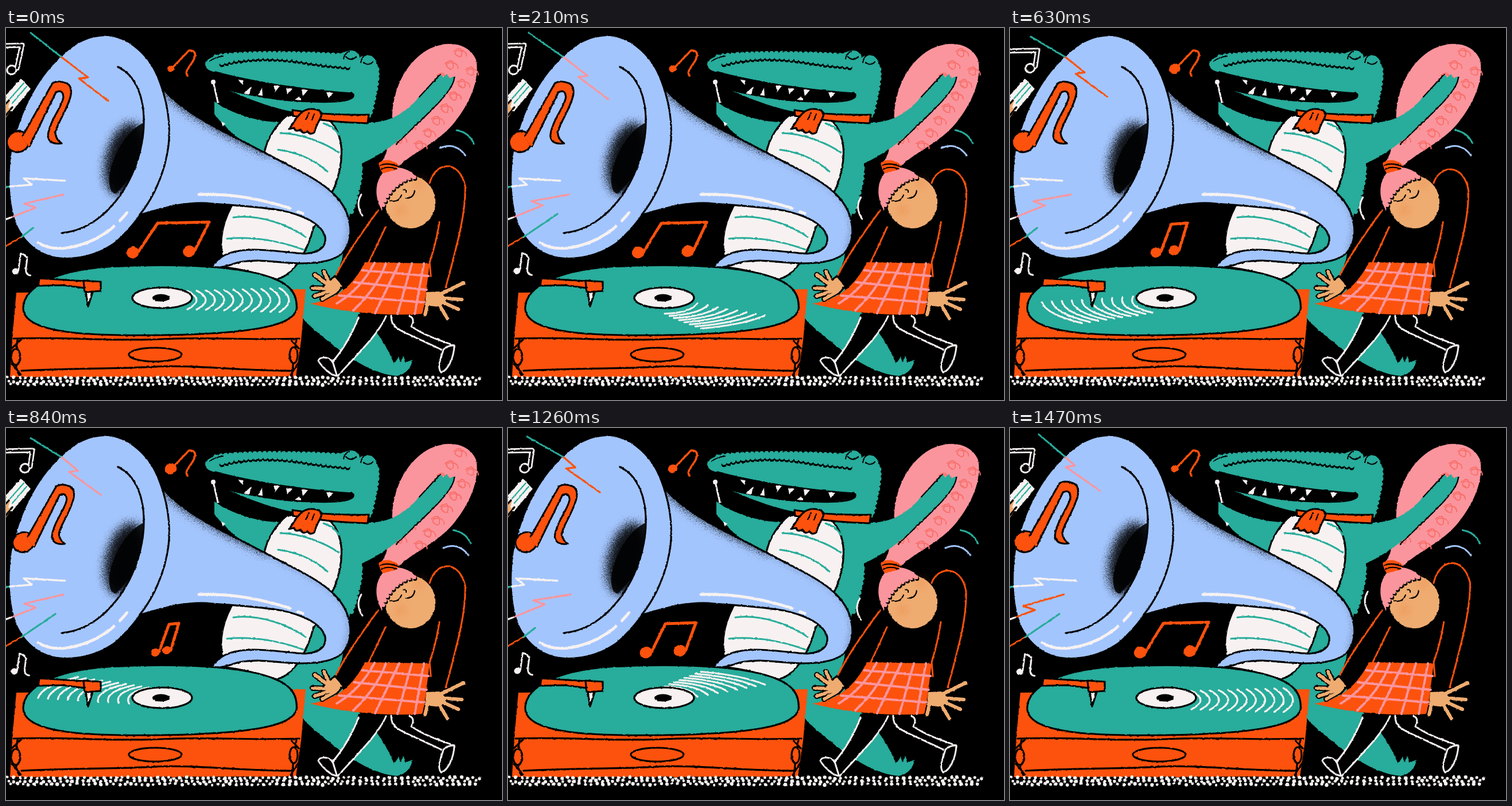
An HTML page that plays this animation: 864 px wide and 648 px high, repeating every 1.68 s.

```html
<!DOCTYPE html>
<html lang="en">
<head>
<meta charset="utf-8">
<title>Gramophone</title>
<style>
:root{--blue:#a3c5fd;--teal:#28ac9b;--red:#fc520d;--pink:#fb959d;--white:#f7f2f1;--skin:#efac71}
html,body{margin:0;width:100%;height:100%;overflow:hidden;background:#000}
svg{display:block;width:100%;height:100%}
path,ellipse{stroke-linecap:round;stroke-linejoin:round}
.blue{fill:var(--blue)}.teal{fill:var(--teal)}.red{fill:var(--red)}.pink{fill:var(--pink)}
.white{fill:var(--white)}.skin{fill:var(--skin)}
.ink{stroke:#000;stroke-width:3.2}
.line{fill:none;stroke:#000;stroke-width:3.2}
.thin{stroke-width:2.2}.mid{stroke-width:3}.bold{stroke-width:5}
.w{stroke:var(--white)}.t{stroke:var(--teal)}.r{stroke:var(--red)}.k{stroke:var(--pink)}.s{stroke:var(--skin)}
.dots{fill:none;stroke-width:9;stroke-dasharray:0 8.5}
.pose{visibility:hidden;animation:show 1.68s step-end infinite;animation-delay:calc((var(--i) - 8)*210ms)}
@keyframes show{0%{visibility:visible}12.5%,100%{visibility:hidden}}
</style>
</head>
<body>
<svg viewBox="0 0 864 648" preserveAspectRatio="none">
<defs>
  <filter id="rough" filterUnits="userSpaceOnUse" x="0" y="0" width="864" height="648" color-interpolation-filters="sRGB">
    <feTurbulence type="fractalNoise" baseFrequency=".2" numOctaves="2" seed="4"/>
    <feDisplacementMap in="SourceGraphic" scale="2.6" xChannelSelector="R" yChannelSelector="G"/>
  </filter>
  <filter id="spray" filterUnits="userSpaceOnUse" x="0" y="0" width="864" height="648" color-interpolation-filters="sRGB">
    <feGaussianBlur in="SourceGraphic" stdDeviation="7" result="b"/>
    <feTurbulence type="fractalNoise" baseFrequency=".8" numOctaves="2" seed="7"/>
    <feDisplacementMap in="b" scale="34" xChannelSelector="R" yChannelSelector="G"/>
  </filter>
  <path id="rim" d="M195,68C248,92 252,185 219,256C198,302 156,352 97,357"/>
  <clipPath id="mouth"><path d="M195,68C248,92 252,185 219,256C198,302 156,352 97,357L0,357V68Z"/></clipPath>
  <path id="tube" d="M274,106C300,138 350,166 400,191L500,243C550,268 600,298 600,355C598,398 570,410 512,410C470,409 448,402 412,407C392,410 386,418 358,417C368,400 386,388 425,386C468,386 492,392 522,393C548,391 558,380 556,364C550,340 515,326 485,319C440,310 390,309 350,305C305,303 270,315 235,325Z"/>
  <clipPath id="tubeClip"><use href="#tube"/></clipPath>
  <path id="ridge" d="M376,60C420,48 470,48 520,56S575,62 598,66"/>
  <path id="fringe" d="M711,260C688,262 664,282 656,312"/>
  <path id="fingers" d="M564,446L554,425M562,448L538,430M560,454L534,453M564,458L538,467M572,460L551,472M756,464L797,444M758,470L794,473M757,476L788,490M752,478L769,506M735,478L730,499"/>
</defs>
<rect width="864" height="648"/>
<g filter="url(#rough)">
  <!-- paper and hand at the left edge -->
  <path class="white" d="M0,117L26,88L43,106L10,146L0,138Z"/>
  <path class="line t thin" d="M7,123L31,96M11,131L36,102"/>
  <path class="skin" d="M-4,140L4,124L7,127L4,138L12,138L-4,162Z"/>
  <path class="line" d="M-2,134L5,126M0,152L11,138"/>

  <!-- ponytail -->
  <path class="pink" d="M654,233C668,215 671,180 673,148C676,100 700,56 738,36C772,20 808,28 819,56C826,92 806,134 780,166C752,200 715,212 685,240Z"/>
  <g id="curls"></g>

  <!-- crocodile -->
  <path class="teal" d="M500,150L632,165C668,164 694,150 720,120L756,80L762,86L768,80L772,88L781,84C780,104 756,130 715,168C680,202 650,222 620,236C622,265 612,300 600,318L585,405C575,425 582,455 600,480C640,520 660,545 676,585L684,573L687,582L693,571L695,583L708,578C706,592 696,604 680,606C630,602 575,560 522,512L470,440L440,300L470,180Z"/>
  <path class="line thin" d="M781,86C780,104 756,130 715,168L680,202M756,81L720,120"/>
  <path class="dots t" d="M618,245C616,275 608,300 600,325"/>
  <path class="teal" d="M363,128C390,148 440,165 482,164L450,218C415,204 385,178 363,150Z"/>
  <path class="white" d="M375,163l6,3l-3,6z"/>
  <path class="line w" d="M361,94L369,129"/><circle class="white" cx="361" cy="94" r="4"/>
  <path class="white ink" d="M490,152L560,157C588,182 592,225 572,278L535,350C520,405 490,440 465,437C430,424 405,420 384,417C368,385 374,345 393,310L450,218C454,192 474,164 490,152Z"/>
  <path class="line t mid" d="M478,183C515,184 555,200 580,217M474,212C512,217 540,232 560,250M553,166C566,170 574,176 580,186M396,330C440,324 490,342 522,364M385,367C430,362 480,372 518,386"/>
  <path class="teal" d="M347,62C350,50 372,46 400,44L560,44C580,50 584,42 592,41C606,36 616,42 616,52C624,44 642,46 645,60C653,72 648,95 644,112L635,156L500,146C462,138 432,128 383,106L410,112L605,121L606,114C540,112 440,98 365,77C350,74 347,68 347,62Z"/>
  <path d="M362,76C440,94 540,112 606,114L606,120C590,130 510,130 470,124C430,118 400,114 383,106Z"/>
  <path class="line" d="M383,106C420,116 480,127 530,128C570,130 606,128 606,116M365,77C440,98 540,110 603,114"/>
  <path class="white" d="M404,90l9,1l-1,8zM466,100l11,1l-8,10zM488,104l11,2l-9,10zM515,107l11,1l-9,11zM558,112l12,1l-8,9zM414,114l13,-12l-3,14zM439,117l7,-13l1,14zM503,125l8,-6l3,7z"/>
  <path class="dots t" d="M366,50C410,43 500,43 582,48"/>
  <path class="dots t" d="M646,72C648,95 640,125 634,150"/>
  <use href="#ridge" class="dots" stroke="#000" y="3.5"/><use href="#ridge" class="dots t"/>
  <path class="line thin" d="M355,58C362,52 370,50 378,49M592,50q9,9 18,0M623,60q8,7 16,-1M588,54q2,-11 10,-13M618,60q2,-10 8,-13"/>
  <path class="red ink" d="M499,143C545,150 590,152 632,151L630,166C585,165 540,160 500,153Z"/>
  <path class="red ink" d="M516,146C528,138 548,140 550,150C548,160 541,166 537,182Q530,187 525,180Q517,186 513,177Q504,182 502,174L493,176C500,168 505,155 516,146Z"/>
  <path class="line thin" d="M528,148L522,160M537,150L533,160"/>

  <!-- horn -->
  <use href="#tube" class="blue ink"/>
  <g clip-path="url(#tubeClip)"><g filter="url(#spray)" fill="none" stroke="#000">
    <path stroke-width="14" d="M272,98C300,130 350,160 400,185L455,212"/>
    <path stroke-width="8" opacity=".5" d="M455,210L540,256C592,284 610,320 605,360L596,395"/>
  </g></g>
  <path class="blue" d="M100,47C126,22 150,14 178,14C230,20 268,75 278,125C287,165 287,205 274,245C256,295 228,338 190,372C160,394 130,400 100,400C60,398 34,374 20,345C6,312 3,262 10,215C22,160 48,92 100,47Z"/>
  <path class="line" d="M238,42C268,75 290,145 283,205C277,250 258,295 233,325"/>
  <g clip-path="url(#mouth)">
    <ellipse cx="207" cy="228" rx="33" ry="64" transform="rotate(14 207 228)" filter="url(#spray)" opacity=".9"/>
    <path opacity=".85" d="M242,164C214,175 188,215 181,252C177,276 184,290 192,288L240,236Z"/>
  </g>
  <use href="#rim" class="line"/>
  <path class="line w bold" d="M336,290C400,288 450,300 495,314M509,320L517,323M56,374C90,396 150,378 188,346M198,336L211,322"/>

  <!-- turntable -->
  <path class="red" d="M18,461L522,455L514,545L505,607L7,608L11,540Z"/>
  <path class="line" d="M13,541C120,538 180,546 270,542S430,544 511,541M27,597C120,592 200,594 260,590S420,598 496,597M20,543Q18,555 17,574T24,606M26,543L10,558M10,585L26,604M506,543Q504,555 502,570T498,606M496,543L510,558M510,582L496,604"/>
  <ellipse class="red ink" cx="17" cy="573" rx="8" ry="14"/><ellipse class="red ink" cx="501" cy="570" rx="7" ry="14"/>
  <ellipse class="line" cx="260" cy="569" rx="46" ry="12"/>
  <path class="teal ink" d="M30,488C30,450 90,418 200,415C300,410 420,415 470,438C500,450 508,470 506,490C500,520 420,533 270,535C130,537 30,530 30,488Z"/>
  <g id="grooves"></g>
  <ellipse class="white ink" cx="272" cy="470" rx="52" ry="18"/><ellipse cx="270" cy="470" rx="15" ry="6.5"/>
  <path class="red ink" d="M58,436L137,441L137,453L100,448L56,449Z"/>
  <path class="red ink" d="M135,440L165,442L165,458L137,460Z"/>
  <path class="white ink" d="M139,460L151,460L143,485Z"/>

  <!-- girl -->
  <path d="M650,312C620,360 592,398 574,432L590,448L632,408L738,410L740,462L767,456C785,390 800,330 797,275C790,245 750,240 738,270Z"/>
  <path d="M614,498L666,498L655,520L580,606L566,580C590,560 604,530 614,498Z"/>
  <path class="line w mid" d="M614,504C604,532 586,562 569,581M662,502C648,535 610,570 578,606M569,581C558,570 545,574 544,580C552,592 566,606 578,606M569,581L576,604M671,501C670,520 685,526 700,533L758,560M703,502C712,505 709,515 706,520C730,536 755,544 781,553M781,553C780,575 770,596 758,600C750,590 758,575 762,560Q770,552 781,553"/>
  <g id="coat"></g>
  <path class="red" d="M625,408L738,410L727,498C660,502 590,496 530,480C575,474 606,448 625,408Z"/>
  <path class="line k" d="M642,409Q618,455 576,480M662,410Q645,455 605,492M685,410L643,496M707,410L682,498M728,410L712,498M620,422L736,432M606,443L733,456M580,466L729,478" style="stroke-width:4"/>
  <use href="#fingers" fill="none" stroke="#000" stroke-width="10"/>
  <path class="skin ink" d="M573,432L588,449L576,463L560,462L552,450Z"/>
  <path class="skin" d="M732,460L755,459L768,472L756,486L730,483Z"/>
  <use href="#fingers" class="line s" style="stroke-width:6"/>
  <ellipse class="skin" cx="704" cy="303" rx="44" ry="46" transform="rotate(-12 704 303)"/>
  <g filter="url(#spray)" fill="#ee7d3c" opacity=".55"><circle cx="687" cy="317" r="8"/><circle cx="720" cy="271" r="7"/></g>
  <path class="pink" d="M714,259C700,242 670,236 655,254C642,272 642,295 655,318C660,288 682,265 714,259Z"/>
  <use href="#fringe" class="dots" stroke="#000" x="1.5" y="2.5" style="stroke-width:7.5"/>
  <use href="#fringe" class="dots k" style="stroke-width:7"/>
  <path class="red" d="M649,236C656,228 672,228 684,238L680,247L656,253L652,246Z"/>
  <path class="line thin" d="M652,239Q666,234 682,241M654,246Q664,240 680,245"/>
  <path class="line thin" d="M668,301Q684,305 689,291M696,296Q709,298 712,284M692,282q6,-2 5,4"/>
  <g id="air"></g>
  <g id="pebbles" class="white"></g>
</g>
</svg>
<script>
const POSES = 8, TAU = Math.PI * 2;
const $ = id => document.getElementById(id);
const [red, teal, pink, white, blue] = ['red', 'teal', 'pink', 'white', 'blue'].map(c => `var(--${c})`);

const wave = (i, turns, peak) => Math.cos(TAU * turns * (i - peak) / POSES);
const jolt = i => wave(i, 3, 2);
const line = (d, color, width = 3) =>
  `<path d="${d}" fill="none" stroke="${color}" stroke-width="${width}"/>`;
const head = (x, y, r, color) =>
  `<ellipse cx="${x}" cy="${y}" rx="${r * 1.1}" ry="${r}" transform="rotate(-20 ${x} ${y})" fill="${color}"/>`;
const place = (x, y, size, art) => `<g transform="translate(${x} ${y}) scale(${size})">${art}</g>`;

// draws one group per pose; CSS shows them in turn
function layer(id, draw) {
  let out = '';
  for (let i = 0; i < POSES; i++) out += `<g class="pose" style="--i:${i}">${draw(i)}</g>`;
  $(id).insertAdjacentHTML('beforeend', out);
}

// record shine: arcs that circle the label once per loop
layer('grooves', i => {
  const angle = TAU * i / 7, side = Math.abs(Math.cos(angle));
  const count = Math.round(4 + 7 * side);
  const at = (r, a) => [272 + 230 * r * Math.cos(a), 474 + (45 * r + 12) * Math.sin(a)];
  let d = '';
  for (let n = 0; n < count; n++) {
    const r = .26 + (.52 + .18 * side) * n / (count - 1);
    const span = (.26 + .12 * side) / Math.sqrt(r);
    const a = at(r, angle - span), m = at(r, angle), b = at(r, angle + span);
    const bend = m.map((v, k) => 2 * v - (a[k] + b[k]) / 2);
    d += `M${a}Q${bend} ${b}`;
  }
  return line(d, white, 3.2);
});

// coat outline
layer('coat', i => {
  const j = jolt(i), top = 240 - 9 * j, back = 800 + 2 * j;
  return line(`M738,270C748,${top - 8} 790,${top - 12} ${back},${top + 36}C${back + 1},${top + 85} 785,380 766,452` +
    `M${755 + j},338Q${750 + j},372 738,408L740,432M648,318C${625 + j},350 592,395 575,430M${661 + j},347Q646,378 632,408`, red);
});

// big note: a quick hop to the right
layer('air', i => {
  const hop = Math.exp(-1.5 * (i - 5) ** 2);
  const glyph = 'M8,-10L60,-102Q70,-108 86,-101Q94,-96 92,-82C88,-58 64,-26 65,-14Q66,-4 76,3' +
    'Q54,6 52,-10C54,-36 78,-62 79,-78Q78,-92 66,-86L20,8Z';
  return place(21 + 3 * i / 4 + 28 * hop, 198 + 4 * hop, 1 - .2 * hop,
    `<g class="red ink">${head(0, 0, 18, red)}<path d="${glyph}"/></g>` + line('M10,-8L19,5', red, 5));
});

// small notes
layer('air', i => place(287, 71, 1,
  head(0, 0, 7.5 - 2 * wave(i, 1, 0), red) + line('M4,-3L32,-32Q44,-32 42,-22C40,-8 22,2 29,12', red, 3.6)));
layer('air', i => place(15.5 + 1.5 * wave(i, 1, 7), 424 + jolt(i), 1,
  head(0, 0, 5.5, white) + line('M5,-2L9,-31Q20,-29 20,-22C20,-10 13,6 26,7', white, 3)));

// beamed note folding up and opening again
layer('air', i => {
  const open = (1 + wave(i, 1, 0)) / 2, half = 10 + 39 * open, y = 340 - 2 * open;
  const r = 7 + 3 * Math.min(1, open * 4), left = 270 - half, right = 270 + half;
  return head(left, 391, r, red) + head(right, 389 - 2 * (1 - open), r, red) +
    line(`M${left + r},389L${left + 24 + 19 * open},${y + 2}L${right + 21 + 14 * open},${y}L${right + r},387`, red, 5);
});

// outlined note in the corner: jumps out, then slides back
layer('air', i => {
  const out = i > 2, x = out ? 56 - 2 * i : 30, y = out ? 37 : 28, hx = x - (out ? 15 : 20), hy = y + (out ? 33 : 45);
  const d = `M-9,${y + 3}L${x - 2},${y + 2}L${hx + 9},${hy - 3}`;
  return line(d, white, 9) + head(hx, hy, 9, white) + head(hx, hy, 6, '#000') + line(d, '#000', 3.5);
});

// sparks: a thin tip, then a zigzag
const bolt = (tip, tipColor, points, color) => line(`M${tip}L${points[0]}`, tipColor) + line('M' + points.join(' '), color, 3.3);
layer('air', i => {
  const x = 143 - 4.3 * i, y = 86 - 2.9 * i;
  return bolt([43 + 10 * jolt(i), 13 + 5 * wave(i, 1, 4.5)], teal,
    [[97, 51], [x, y], [x - 16, y + 2], [178 - 3 * i, 127 - 2.5 * i]], i % 3 ? pink : red);
});
layer('air', i => {
  const x = 45 + 17 * jolt(i);
  return bolt([-2, 277], teal, [[7, 276], [x, 273], [x - 14, 262], [103 + 17 * jolt(i), 266]], white);
});
layer('air', i => {
  const x = 52 - 12 * jolt(i), y = 338 - .48 * x;
  return bolt([-2, 334], white, [[11, 329], [x, y], [x - 20, y - 7], [100 - 9 * jolt(i), 290]], jolt(i) > .5 ? red : pink);
});
layer('air', i => {
  const x = i % 3 ? 86 : 47;
  return bolt([-2, 381], red, [[27, 364], [x, 378 - .63 * x]], teal);
});

// swing marks around the girl
layer('air', i => {
  const j = jolt(i), drift = 7 * wave(i, 1, 6.5);
  return place(drift, 0, 1, line('M782,178Q804,182 812,201', teal)) +
    place(4 * wave(i, 1, 5), 0, 1, line('M759,209Q785,198 803,222', blue)) +
    place(6 * j, -7 * j, 1, line('M619,290Q608,308 621,327', white));
});

let seed = 9;
const rnd = () => (seed = seed * 16807 % 2147483647) / 2147483647;

// curls scattered along the ponytail
let curls = '';
for (let n = 0; n < 15; n++) {
  const t = n / 14, x = 690 + 104 * t + (n % 2 ? 14 : -14), y = 202 - 150 * t + (n % 2 ? 10 : -12);
  curls += `M${x},${y}q14,-10 14,3t-11,3q-3,-8 10,-7q10,2 9,10`;
}
$('curls').innerHTML = line(curls, '#f8706b', 2);

// gravel
let stones = '';
for (let row = 0; row < 3; row++)
  for (let x = 2 + row * 3; x < 826; x += 8 + rnd() * 4)
    stones += `<circle cx="${x}" cy="${608 + row * 5.5 + rnd() * 3}" r="${2.3 + rnd()}"/>`;
$('pebbles').innerHTML = stones;
</script>
</body>
</html>
```
